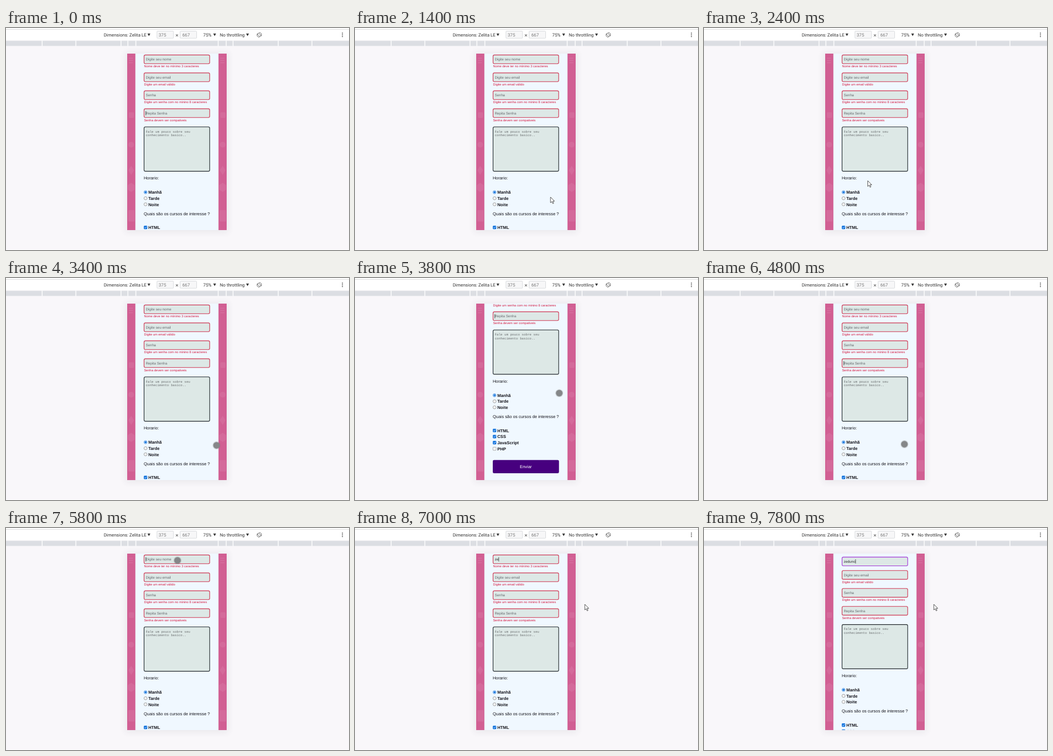
An HTML page for the animation above (8 s loop, 600 by 390 pixels).

```html
<!DOCTYPE html>
<html lang="pt">
<head>
<meta charset="utf-8">
<style>
  html, body { margin: 0; width: 100%; height: 100%; overflow: hidden; background: #f9f7fa; }
  svg { display: block; width: 600px; height: 390px; text-rendering: geometricPrecision; }
  text { font-family: "Liberation Sans", Arial, sans-serif; font-size: 7.42px; fill: #16161c; white-space: pre; }
  .tool { font-family: Roboto, sans-serif; font-size: 7.8px; fill: #333; }
  .dim { fill: #777; text-anchor: middle; }
  .times { font-size: 9.5px; fill: #555; }
  .error { font-size: 5.57px; fill: #d3173c; }
  .hint, .typed { font-size: 6.19px; fill: #666a6f; }
  .typed { fill: #2a2a2e; }
  .mono { font-family: "Liberation Mono", monospace; font-size: 5.65px; fill: #6c7072; }
  .bold { font-weight: bold; }
  .button { fill: #fff; text-anchor: middle; }
  .field { fill: #dde8e6; stroke: #cf3a55; stroke-width: 1.1; }
  .area { stroke: #262c30; }
</style>
</head>
<body>
<svg viewBox="0 0 600 390">
  <defs>
    <filter id="blur" x="-20%" y="-20%" width="140%" height="140%"><feGaussianBlur stdDeviation="6"/></filter>
    <clipPath id="screen"><rect x="212" y="45" width="174" height="310"/></clipPath>
  </defs>
  <rect width="600" height="390" fill="#f9f7fa"/>
  <rect width="600" height="21.5" fill="#fff"/>
  <rect y="2" width="600" height="1" fill="#dedede"/>
  <rect y="389" width="600" height="1" fill="#fff"/>
  <g id="toolbar"></g>
  <rect x="209" y="43" width="180" height="316" fill="#404050" opacity=".08" filter="url(#blur)"/>
  <g clip-path="url(#screen)">
    <rect x="212" y="45" width="174" height="311" fill="#d15f93"/>
    <g id="pattern" fill="#fff" opacity=".07"></g>
    <rect x="226.3" y="45" width="145.4" height="311" fill="#f0f8ff"/>
    <g id="page">
      <g id="nameRow"></g>
      <g id="nameError"></g>
      <g id="rest"></g>
      <rect id="caret" width=".7" height="7.4" fill="#222"/>
    </g>
  </g>
  <g id="touch">
    <circle r="6.9" fill="#777" opacity=".3"/>
    <circle r="5.7" fill="#858789"/>
  </g>
  <path id="arrow" d="M0 0V10L2.4 7.9 4 11.5 5.6 10.8 4 7.2H7Z" fill="#fff" stroke="#333" stroke-width=".8" stroke-linejoin="round"/>
</svg>
<script>
const $ = id => document.getElementById(id);
const text = (x, y, cls, s) => `<text x="${x}" y="${y}" class="${cls}">${s}</text>`;
const rect = (x, y, w, h, attrs = '') => `<rect x="${x}" y="${y}" width="${w}" height="${h}" ${attrs}/>`;
const field = (y, h, cls = '', attrs = '') => rect(241.5, y, 114.8, h, `rx="2.2" class="field ${cls}" ${attrs}`);

function toolbar() {
  const drop = x => `<path d="M${x} 9.8h5l-2.5 4.4z" fill="#333"/>`;
  const box = (x, textX, s) => rect(x, 5.5, 29, 12.5, 'rx="1" fill="#f7f7f8" stroke="#d4d6d9" stroke-width=".8"') +
    text(textX, 14.5, 'tool dim', s);
  const gap = x => rect(x, 22, 1.5, 10, 'fill="#fbfbfc"');
  const ruler = rect(0, 22.5, 600, 9, 'fill="#dcdee3"') +
    [72, 86, 98, 177, 236].map(d => gap(298.5 - d) + gap(298.5 + d)).join('');
  const rotate = `<g fill="none" stroke="#555" stroke-width=".8"><circle cx="443" cy="12" r="3.9" stroke-dasharray="9.2 3" transform="rotate(80 443 12)"/>` +
    `<rect x="441.5" y="9" width="3" height="6" transform="rotate(-45 443 12)"/></g>`;
  const dots = [9, 12, 15].map(y => `<circle cx="588.5" cy="${y}" r=".9" fill="#555"/>`).join('');
  return ruler + text(171, 14.5, 'tool', 'Dimensions: Zelita LE') + drop(247.5) +
    box(264, 273.5, '375') + text(299, 15.6, 'tool dim times', '×') + box(304.5, 315, '667') +
    text(345, 14.5, 'tool', '75%') + drop(362.5) + text(374, 14.5, 'tool', 'No throttling') + drop(420) + rotate + dots;
}

function formRest() {
  const inputs = [
    ['Digite seu email', 'Digite um email válido'],
    ['Senha', 'Digite um senha com no minino 8 caracteres'],
    ['Repita Senha', 'Senha devem ser compativeis']
  ].map(([hint, error], i) => {
    const y = 78.9 + i * 31.5;
    return field(y, 15.4) + text(244.4, y + 9.9, 'hint', hint) + text(241.4, y + 22, 'error', error);
  }).join('');
  const radios = ['Manhã', 'Tarde', 'Noite'].map((label, i) => {
    const y = 288.5 + i * 10.6;
    return `<circle cx="244.1" cy="${y}" r="2.7" fill="#fff" stroke="${i ? '#777' : '#0b6fdb'}" stroke-width=".7"/>` +
      (i ? '' : `<circle cx="244.1" cy="${y}" r="1.7" fill="#0b6fdb"/>`) + text(249, y + 2.8, 'bold', label);
  }).join('');
  const checks = ['HTML', 'CSS', 'JavaScript', 'PHP'].map((label, i) => {
    const y = 347.7 + i * 10.7, on = i < 3;
    return rect(241.4, y, 5.4, 5.4, `rx=".8" fill="${on ? '#0b6fdb' : '#fff'}" stroke="${on ? '#0b6fdb' : '#777'}" stroke-width=".6"`) +
      (on ? `<path d="M242.4 ${y + 2.8}l1.2 1.2 2.3-2.6" fill="none" stroke="#fff" stroke-width=".9"/>` : '') +
      text(249, y + 5.5, 'bold', label);
  }).join('');
  return inputs + field(173.8, 77.8, 'area') +
    text(244.4, 183.6, 'mono', 'Fale um pouco sobre seu') + text(244.4, 190.4, 'mono', 'conhecimento basico..') +
    text(241, 266, '', 'Horario:') + radios + text(241, 328.6, '', 'Quais são os cursos de interesse ?') + checks +
    rect(241, 402.3, 115.8, 23.2, 'rx="2.3" fill="#47007f"') + text(298.8, 416.5, 'button', 'Enviar');
}

$('toolbar').innerHTML = toolbar();
$('pattern').innerHTML = [215, 375].map(x =>
  rect(x, 52, 7, 2) + rect(x, 56, 7, 2) + rect(x, 60, 7, 2) + rect(x, 148, 9, 10, 'rx="2"') +
  `<circle cx="${x + 4}" cy="205" r="5"/><path d="M${x - 1} 250l5-8 5 8-5 8z"/>` +
  `<path d="M${x - 2} 276l6-4 6 4v8l-6 4-6-4z"/>` + rect(x - 1, 320, 11, 20, 'rx="1"')).join('');
$('nameRow').innerHTML = field(47.4, 15.4, '', 'id="nameField"') +
  '<text id="nameText" x="244.4" y="57.3" class="hint">Digite seu nome</text>';
$('nameError').innerHTML = text(241.4, 69.4, 'error', 'Nome deve ter no mínimo 3 caracteres');
$('rest').innerHTML = formRest();

const NAME = 'zeduno', STEP = 200, LOOP = 8000;
const FOCUS_NAME = 5800, FIRST_KEY = 6800, TOUCH_START = 2600, TOUCH_END = 6400;

// Each key is [time, ...values]
const pointerKeys = [
  [200, 92, 2], [600, 190, 110], [1000, 310, 250], [1400, 342, 297], [1600, 532, 250],
  [1800, 330, 215], [2000, 114, 190], [2300, 260, 260], [2600, 362, 292],
  [3000, 358, 205], [3400, 368.3, 294], [3800, 357.3, 202.3], [4200, 354, 205], [4800, 350.6, 292],
  [5200, 345, 250], [5800, 300, 57], [6100, 305, 57], [6400, 402, 134]
];
const scrollKeys = [[2600, 0], [3000, 82.5], [3400, 0], [3800, 82.5], [4200, 82.5], [4800, 0]];

function valuesAt(keys, t) {
  const next = keys.findIndex(k => k[0] > t);
  if (next < 0) return keys.at(-1).slice(1);
  if (next === 0) return keys[0].slice(1);
  const a = keys[next - 1], b = keys[next];
  const p = (t - a[0]) / (b[0] - a[0]), ease = p * p * (3 - 2 * p);
  return a.slice(1).map((v, i) => v + (b[i + 1] - v) * ease);
}

const move = (id, x, y) => $(id).setAttribute('transform', `translate(${x} ${y})`);
const show = (id, on) => { $(id).style.visibility = on ? 'visible' : 'hidden'; };

function draw(t) {
  const typed = NAME.slice(0, Math.max(0, Math.floor((t - FIRST_KEY) / STEP) + 1));
  const valid = typed.length >= 3;
  const label = $('nameText');
  label.textContent = typed || 'Digite seu nome';
  label.setAttribute('class', typed ? 'typed' : 'hint');
  $('nameField').style.stroke = valid ? '#a53bd6' : '';
  show('nameError', !valid);
  move('nameRow', 0, valid ? 3.7 : 0);
  move('rest', 0, valid ? -4.2 : 0);
  move('page', 0, -valuesAt(scrollKeys, t)[0]);

  const onName = t >= FOCUS_NAME, phase = t % 1000;
  const caretX = 244.4 + (typed ? label.getComputedTextLength() : 0);
  move('caret', caretX, onName ? (valid ? 55 : 51.3) : 146);
  show('caret', typed || phase >= 600 || phase < 100);

  const [x, y] = valuesAt(pointerKeys, t);
  const touching = t >= TOUCH_START && t < TOUCH_END && x < 386;
  move('touch', x, y);
  move('arrow', x, y);
  show('touch', touching);
  show('arrow', t >= 200 && !touching);
}

const start = performance.now();
function frame() {
  const t = (performance.now() - start) % LOOP;
  draw(Math.floor(t / STEP) * STEP);
  requestAnimationFrame(frame);
}
frame();
</script>
</body>
</html>
```
